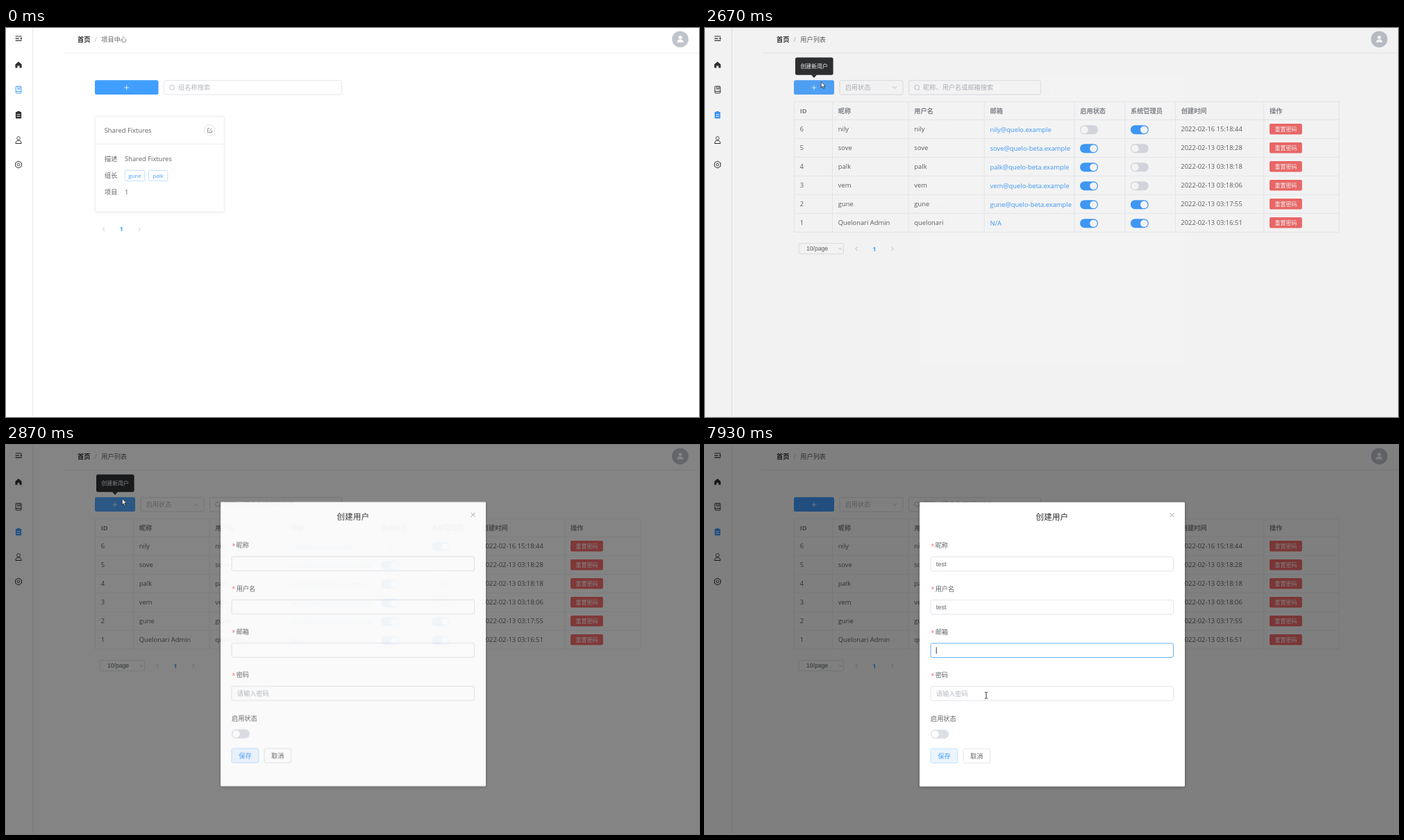
An HTML page that plays this animation: 998x561 px, repeating every 8000 ms.

```html
<!DOCTYPE html>
<html lang="zh-CN">
<head>
<meta charset="utf-8">
<title>User admin</title>
<style>
html, body { margin: 0; width: 100%; height: 100%; overflow: hidden; background: #fff; }
svg { display: block; width: 998px; height: 561px; }
text { font-family: "Open Sans", "Noto Sans CJK SC", "Noto Sans CJK", sans-serif; white-space: pre; }
.ar { font-family: "Liberation Sans", "Noto Sans CJK SC", sans-serif; }
.b { font-weight: 700; }
</style>
</head>
<body>
<svg id="stage" viewBox="0 0 998 561"></svg>
<script>
const BLUE = '#409eff', DARK = '#303133', TEXT = '#606266', MUTE = '#b4b7bf', LINE = '#dcdfe6', CELL = '#ebeef5';

// Markup helpers; text is placed by its vertical middle.
const text = (x, y, s, o = {}) => {
  const size = o.size || (/[a-z0-9]/i.test(s) ? 9.4 : 9.2);
  return `<text x="${x}" y="${y + size * .37}" font-size="${size}" fill="${o.fill || TEXT}"` +
    ` text-anchor="${o.anchor || 'start'}" class="${o.cls || ''}">${s}</text>`;
};
const mid = (x, y, s, fill, size) => text(x, y, s, { fill, size, anchor: 'middle' });
const box = (x, y, w, h, fill, stroke = 'none', r = 2.5, extra = '') =>
  `<rect x="${x}" y="${y}" width="${w}" height="${h}" rx="${r}" fill="${fill}" stroke="${stroke}" stroke-width=".8" ${extra}/>`;
const line = (d, stroke, w = .8, extra = '') =>
  `<path d="${d}" fill="none" stroke="${stroke}" stroke-width="${w}" ${extra}/>`;
const dot = (x, y, r, fill, stroke = 'none') =>
  `<circle cx="${x}" cy="${y}" r="${r}" fill="${fill}" stroke="${stroke}" stroke-width=".8"/>`;
const group = (id, body, extra = '') => `<g id="${id}" ${extra}>${body}</g>`;

const toggle = (x, y, on) =>
  box(x, y - 6.5, 26, 13, on ? BLUE : LINE, 'none', 6.5) + dot(on ? x + 19.5 : x + 6.5, y, 5.3, '#fff');
const plusButton = (x, w, id) => {
  const c = x + w / 2;
  return box(x, 75.3, w, 20.8, BLUE, 'none', 2.5, `id="${id}"`) +
    line(`M${c - 3.5} 86h7M${c} 82.5v7`, '#fff');
};
const field = (x, w, label, icon) =>
  box(x, 75.7, w, 20.4, '#fff', LINE) +
  (icon ? dot(x + 11.8, 85.6, 3.4, 'none', MUTE) + line(`M${x + 14.3} 88.2l1.6 1.6`, MUTE) : '') +
  text(x + (icon ? 20.7 : 7.7), 85.8, label, { fill: MUTE });
const pager = (x, y) =>
  line(`M${x - 24.5} ${y - 2.7}l-2.7 2.7 2.7 2.7M${x + 24.5} ${y - 2.7}l2.7 2.7-2.7 2.7`, MUTE) +
  text(x, y, '1', { fill: BLUE, size: 8.6, anchor: 'middle', cls: 'b' });
const chevron = (x, y, s) => line(`M${x - s} ${y - s / 2}l${s} ${s} ${s}-${s}`, MUTE);

function frameChrome() {
  const hex = [...Array(7).keys()].map(i => {
    const a = i * Math.PI / 3 + Math.PI / 6;
    return `${(18 + 5 * Math.cos(a)).toFixed(2)} ${(197 + 5 * Math.sin(a)).toFixed(2)}`;
  }).join('L');
  return line('M83 36.2H998', '#e9ebef') + line('M38.6 0V560', '#e2e3e6') +
    box(0, 107, 38, 36, '#ecf5ff', 'none', 0, 'id="hover"') +
    line('M13.6 12h9M13.6 15.1h5.2M13.6 18.2h9', DARK, 1.2) +
    `<path d="M22.7 13.2v3.8l-2.6-1.9z" fill="${DARK}"/>` +
    `<path d="M18 48.4l4.6 4.1v5h-3.1v-3h-3v3h-3.1v-5z" fill="${DARK}"/>` +
    group('book', '<rect x="14.2" y="84.1" width="7.8" height="9.8" rx=".8"/>' +
      '<path d="M14.2 91.4H22M17 84.3v4.2l1.5-1.1 1.5 1.1v-4.2"/>', 'fill="none" stroke-width="1"') +
    group('clip', '<rect x="13.9" y="121" width="8.2" height="9.4" rx=".7"/><rect x="16" y="120" width="4" height="2.4" rx=".5"/>') +
    line('M15.6 124.8h4.8M15.6 127.5h4.8', '#fff', .9) +
    line('M13.9 166.5c0-3 1.8-4.3 4.1-4.3s4.1 1.3 4.1 4.3z', DARK, 1) + dot(18, 159, 2.4, 'none', DARK) +
    line(`M${hex}Z`, DARK, 1, 'stroke-linejoin="round"') + dot(18, 197, 1.9, 'none', DARK) +
    text(103, 16.5, '首页', { fill: DARK, cls: 'b' }) + text(127.6, 16.5, '/', { fill: MUTE, size: 9.2 }) +
    dot(971, 16.2, 11.8, '#c0c4cc') + dot(971, 13.5, 2.5, '#fff') +
    '<path d="M966.3 20.8c0-3 2-4.2 4.7-4.2s4.7 1.2 4.7 4.2z" fill="#fff"/>';
}

function projectPage() {
  const tag = (x, w, s) => box(x, 205.3, w, 15, '#fff', '#b3d8ff', 2) + mid(x + w / 2, 212.8, s, BLUE, 8);
  return text(137.3, 16.5, '项目中心') + plusButton(128, 91.5, 'addGroup') + field(227.4, 256.2, '组名称搜索', true) +
    box(128.3, 127.5, 186, 137.8, '#fff', '#e4e7ed', 2, 'style="filter:drop-shadow(0 1px 2px rgba(0,0,0,.05))"') +
    line('M128.3 167.4h186', '#e4e7ed') +
    text(141.7, 147.8, 'Shared Fixtures') + dot(293.2, 147.5, 7.8, '#fff', LINE) +
    line('M293.5 144.8h-3v6h6v-3M292.4 148.9l4-4.1', '#85888e', .9) +
    text(142, 189, '描述') + text(171, 189, 'Shared Fixtures') +
    text(142, 212.7, '组长') + tag(171.2, 28.6, 'gune') + tag(205.4, 27.4, 'palk') +
    text(142, 237, '项目') + text(171, 237, '1') + pager(166.3, 290);
}

function userPage() {
  const cols = [128.4, 183.5, 293, 402.2, 532, 604.7, 677.5, 804.8, 913.4];
  const at = i => cols[i] + 8.3;
  const heads = ['ID', '昵称', '用户名', '邮箱', '启用状态', '系统管理员', '创建时间', '操作'];
  // nickname, login, mail host, enabled, admin, created
  const rows = [
    ['nily', 'nily', 'quelo.example', 0, 1, '16 15:18:44'],
    ['sove', 'sove', 'quelo-beta.example', 1, 0, '13 03:18:28'],
    ['palk', 'palk', 'quelo-beta.example', 1, 0, '13 03:18:18'],
    ['vem', 'vem', 'quelo-beta.example', 1, 0, '13 03:18:06'],
    ['gune', 'gune', 'quelo-beta.example', 1, 1, '13 03:17:55'],
    ['Quelonari Admin', 'quelonari', '', 1, 1, '13 03:16:51']
  ];
  let s = text(137.3, 16.5, '用户列表') + plusButton(128, 58, 'addUser') +
    field(194, 91, '启用状态') + chevron(273, 85.8, 3.2) + field(293.4, 190.2, '昵称、用户名或邮箱搜索', true);
  s += cols.map(x => line(`M${x} 106V294.5`, CELL)).join('');
  s += line('M128 106.3H913.8', CELL);
  for (let i = 0; i < 7; i++) s += line(`M128 ${132.4 + i * 27}H913.8`, CELL);
  s += heads.map((h, i) => text(at(i), 119.4, h, { fill: '#85888e', cls: 'b' })).join('');
  rows.forEach(([nick, login, host, enabled, admin, date], i) => {
    const y = 146 + i * 27;
    s += text(at(0), y, String(6 - i)) + text(at(1), y, nick) + text(at(2), y, login) +
      text(at(3), y + .3, host ? `${login}@${host}` : 'N/A', { fill: BLUE }) +
      toggle(540, y + .7, enabled) + toggle(612.8, y + .7, admin) +
      text(685.3, y, '2022-02-' + date) +
      box(813, y - 8, 46.8, 15.6, '#f56c6c', 'none', 2) + mid(836.4, y, '重置密码', '#fff', 8);
  });
  return s + box(135, 310.6, 64.6, 15.2, '#fff', LINE, 2) +
    text(146, 318.2, '10/page', { size: 8.6, cls: 'ar' }) + chevron(195, 318.4, 2.4) + pager(244, 318.4);
}

const INPUTS = [161.3, 223.6, 286, 348.3];

function dialog() {
  const labels = ['昵称', '用户名', '邮箱', '密码'];
  return box(309, 82.6, 382, 410, '#fff', 'none', 1.5, 'style="filter:drop-shadow(0 1px 2px rgba(0,0,0,.3))"') +
    mid(499.7, 104, '创建用户', DARK, 11.7) +
    line('M669.6 98l6 6M675.6 98l-6 6', '#909399', .9) +
    labels.map((s, i) => {
      const y = INPUTS[i];
      return text(325.2, y - 15.8, '*', { fill: '#f56c6c' }) + text(331.7, y - 16.4, s) +
        box(325, y, 349.5, 20.5, '#fff', LINE, 2.5, `id="in${i}"`) +
        text(332.8, y + 10.2, '', { size: 9.2, cls: 'ar' }).replace('<text', `<text id="val${i}"`);
    }).join('') +
    text(332.8, 358.5, '请输入密码', { fill: MUTE }) + line('M0 0v9.6', '#222', .9, 'id="caret"') +
    text(325, 394.3, '启用状态') + toggle(325, 417, 0) +
    box(325, 438, 38.8, 20.6, '#ecf5ff', '#b3d8ff') + mid(344.4, 448.2, '保存', BLUE) +
    box(372, 438, 38.6, 20.6, '#fff', LINE) + mid(391.3, 448.2, '取消', TEXT);
}

document.getElementById('stage').innerHTML =
  box(0, 0, 998, 561, '#fff', 'none', 0) + frameChrome() +
  group('projects', projectPage()) + group('users', userPage()) +
  group('menuTip', box(46, 111.6, 47, 25.2, DARK) + `<path d="M46.5 121l-4.5 3.8 4.5 3.8z" fill="${DARK}"/>` +
    mid(69.6, 124.6, '用户中心', '#fff', 7.9)) +
  group('addTip', box(130, 42.6, 54.6, 25.2, DARK) + `<path d="M153 67.4l4 4.6 4-4.6z" fill="${DARK}"/>` +
    mid(157.2, 55.4, '创建新用户', '#fff', 7.9)) +
  group('overlay', box(0, 0, 998, 561, 'rgba(0,0,0,.5)', 'none', 0) + group('dialog', dialog())) +
  group('cursor',
    group('arrow', '<path d="M0 0V8.8L2 7l1.4 3.1 1.4-.6-1.4-3h2.7z" fill="#fff" stroke="#111" stroke-width=".7"/>') +
    group('beam', line('M-2-4.4h1.4l.6.6.6-.6H2M-2 4.4h1.4l.6-.6.6.6H2M0-3.8v7.6', '#222', .9)));

const $ = id => document.getElementById(id);
const set = (id, attrs) => { for (const k in attrs) $(id).setAttribute(k, attrs[k]); };
const show = (id, on) => set(id, { visibility: on ? 'visible' : 'hidden' });
const ramp = (t, from, to) => Math.min(1, Math.max(0, (t - from) / (to - from)));
const smooth = p => p * p * (3 - 2 * p);
const fade = (t, from, to) => smooth(ramp(t, from, to));

// CSS "ease" curve.
function ease(x) {
  const curve = (u, a, b) => 3 * (1 - u) * (1 - u) * u * a + 3 * (1 - u) * u * u * b + u * u * u;
  let lo = 0, hi = 1;
  for (let i = 0; i < 20; i++) {
    const m = (lo + hi) / 2;
    if (curve(m, .25, .25) < x) lo = m; else hi = m;
  }
  return curve(lo, .1, 1);
}

// Each track is one visible stretch of the pointer: [time, x, y].
const TRACKS = [
  [[70, 916, 553], [740, 19, 123], [1000, 19, 123], [1740, 113.5, 122], [1800, 113.5, 122], [2200, 167.3, 77.3], [3880, 167.3, 77.3]],
  [[4140, 362, 137], [4390, 360, 219], [4620, 355.3, 170], [5010, 355.3, 170]],
  [[6810, 738, 274], [7540, 414, 296], [7680, 414, 296], [7910, 405, 361], [8000, 405, 361]]
];

function pointer(t) {
  const track = TRACKS.find(k => t >= k[0][0] && t < k[k.length - 1][0]);
  if (!track) return null;
  const i = track.findIndex(k => k[0] > t);
  const [t0, x0, y0] = track[i - 1], [t1, x1, y1] = track[i];
  const p = fade(t, t0, t1);
  return [x0 + (x1 - x0) * p, y0 + (y1 - y0) * p];
}

const FOCUS = [[4620, 5400], [5400, 6210], [7680, 9000]];
const TYPING = [5060, 5500];

function mix(p) {
  const a = [220, 223, 230], b = [64, 158, 255];
  return `rgb(${a.map((v, i) => Math.round(v + (b[i] - v) * p))})`;
}

function render(t) {
  const onUsers = t >= 940;
  show('projects', !onUsers);
  show('users', onUsers);
  show('hover', t >= 700 && t < 1800);
  set('book', { stroke: onUsers ? DARK : BLUE });
  set('clip', { fill: onUsers ? BLUE : DARK });
  set('menuTip', { opacity: fade(t, 720, 870) - fade(t, 1800, 2000) });
  set('addTip', { opacity: fade(t, 2140, 2340) - fade(t, 2860, 3210) });
  set('addUser', { fill: t >= 2140 && t < 3880 ? '#53a8ff' : BLUE });

  const open = ease(ramp(t, 2640, 2940));
  set('overlay', { opacity: open });
  set('dialog', { opacity: open, transform: `translate(0 ${-13 * (1 - open)})` });

  TYPING.forEach((start, i) => {
    const n = t < start ? 0 : Math.min(4, 1 + Math.floor((t - start) / 80));
    $('val' + i).textContent = 'test'.slice(0, n);
  });
  FOCUS.forEach(([on, off], i) =>
    set('in' + i, { stroke: mix(fade(t, on, on + 200) - fade(t, off, off + 180)) }));
  const active = FOCUS.findIndex(([on, off]) => t >= on && t < off);
  set('caret', { opacity: active < 0 ? 0 : 1 });
  if (active >= 0) {
    const val = $('val' + active);
    const w = val.textContent ? val.getComputedTextLength() : 0;
    set('caret', { transform: `translate(${333.2 + w} ${INPUTS[active] + 5.5})` });
  }

  const pos = pointer(t);
  set('cursor', { opacity: pos ? 1 : 0 });
  if (pos) {
    const [x, y] = pos;
    const inField = t > 3880 && x > 325 && x < 675 && INPUTS.some(top => y > top && y < top + 20.5);
    set('cursor', { transform: `translate(${x} ${y})` });
    set('arrow', { opacity: inField ? 0 : 1 });
    set('beam', { opacity: inField ? 1 : 0 });
  }
}

const begin = performance.now();
function tick() {
  render((performance.now() - begin) % 8000);
  requestAnimationFrame(tick);
}
tick();
</script>
</body>
</html>
```
